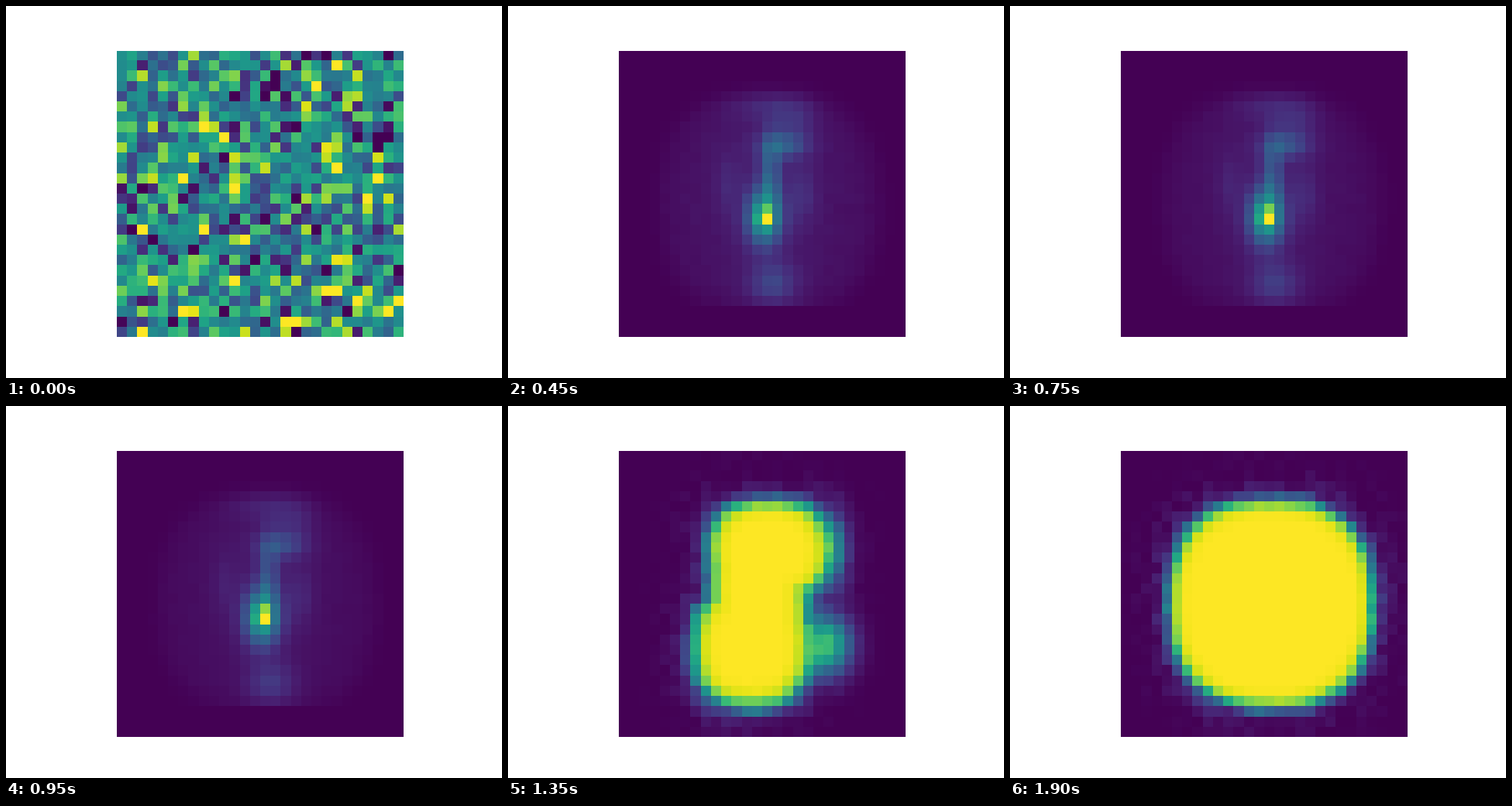
Write a matplotlib script that moves like this. It is 640x480 px and loops after 2.05 s.

```python
import numpy as np
import matplotlib.pyplot as plt
from matplotlib.animation import FuncAnimation

SIZE, FRAMES, INTERVAL = 28, 41, 50
GLOW_END, WAIST_AT, REST_AT = 19, 27, 35
ROW, COL = np.mgrid[0:SIZE, 0:SIZE].astype(float)

rng = np.random.default_rng(7)
NOISE = np.clip(rng.normal(.5, .27, (SIZE, SIZE)), 0, 1)
SPECKS = rng.random((SIZE, SIZE))


def sigmoid(x):
    return 1 / (1 + np.exp(-np.clip(x, -40, 40)))


def logit(p):
    p = np.clip(p, .003, .996)
    return np.log(p / (1 - p))


def lerp(a, b, t):
    return a + (b - a) * t


def blob(row, col, row_spread, col_spread, height):
    return height * np.exp(-.5 * (((ROW - row) / row_spread) ** 2
                                  + ((COL - col) / col_spread) ** 2))


def oval(row, col, half_height, half_width, power=2.5):
    """Rough distance inside a superellipse, negative outside."""
    reach = (np.abs((ROW - row) / half_height) ** power
             + np.abs((COL - col) / half_width) ** power) ** (1 / power)
    return (1 - reach) * half_width


HEAD = oval(9.3, 14.1, 4.9, 5.8)
BELLY = oval(18.7, 12.4, 5.9, 5.6)
TRUNK = oval(13.5, 13.1, 7, 4.7, 4)
WAISTED = np.maximum(np.maximum(HEAD, BELLY), TRUNK)
ROUND = oval(14.5, 14.2, 10.1, 9.9)

# Soft bulges on the right of the waisted form.
BULGES = blob(9, 20, 2.3, 1.2, .5) + blob(18.5, 19.7, 2, 1.7, .7)

STROKES = (blob(13, 14, 7, 4, .06)          # haze
           + blob(11.5, 14.3, 2.4, .7, .27)   # stem
           + blob(8.8, 15.5, .9, 1.6, .27)    # bar
           + blob(6.5, 16.5, 1.6, 1.5, .11)
           + blob(4.8, 14, 1, 2.5, .09)       # crown
           + blob(22.3, 14.5, 1.4, 1.6, .2)   # foot
           + blob(12.5, 10, 2, .8, .06)       # ribs
           + blob(13.7, 17.4, 1.8, .9, .09))
CORE = blob(15.8, 13.7, 1.9, 1.2, .52)
LIT_AREA = sigmoid((ROUND + .7) / .6) * (ROW <= 24)


def glow(k):
    """Dim average figure whose core slowly gains on its surroundings."""
    u = (k - 1) / (GLOW_END - 1)
    texture = .04 + .02 * SPECKS * .95 ** k
    spark = blob(lerp(15.9, 15.65, u), 13.8, .55, .45, .52)
    image = LIT_AREA * (lerp(1.05, .68, u) * (texture + STROKES)
                        + lerp(1, 1.1, u) * (CORE + spark))
    return image / image.max()


def body(p):
    """Saturated shape widening from the waisted form to the round one."""
    field = lerp(WAISTED, ROUND, p)
    fringe = .25 * SPECKS ** 1.5 * np.exp(np.minimum(field, 0) / 1.5)
    empty = (1 - sigmoid(field / lerp(.45, .35, p))) * (1 - (1 - p) * BULGES)
    image = 1 - empty * (1 - fringe)
    return image / image.max()


def picture(k):
    if k == 0:
        return NOISE
    if k <= GLOW_END:
        return glow(k)
    if k < WAIST_AT:
        mix = ((k - GLOW_END) / (WAIST_AT - GLOW_END)) ** 1.5
        image = sigmoid(lerp(logit(glow(GLOW_END)), logit(body(0)), mix))
        return image / image.max()
    growth = min((k - WAIST_AT) / (REST_AT - WAIST_AT), 1)
    return body(1 - (1 - growth) ** 2.5)


fig = plt.figure(figsize=(6.4, 4.8), dpi=100)
ax = fig.add_subplot()
ax.axis("off")
shown = ax.imshow(picture(0), cmap="viridis", vmin=0, vmax=1, interpolation="nearest")


def update(k):
    shown.set_data(picture(k))
    return [shown]


anim = FuncAnimation(fig, update, frames=FRAMES, interval=INTERVAL,
                     repeat=True, repeat_delay=0)
plt.show()
```
